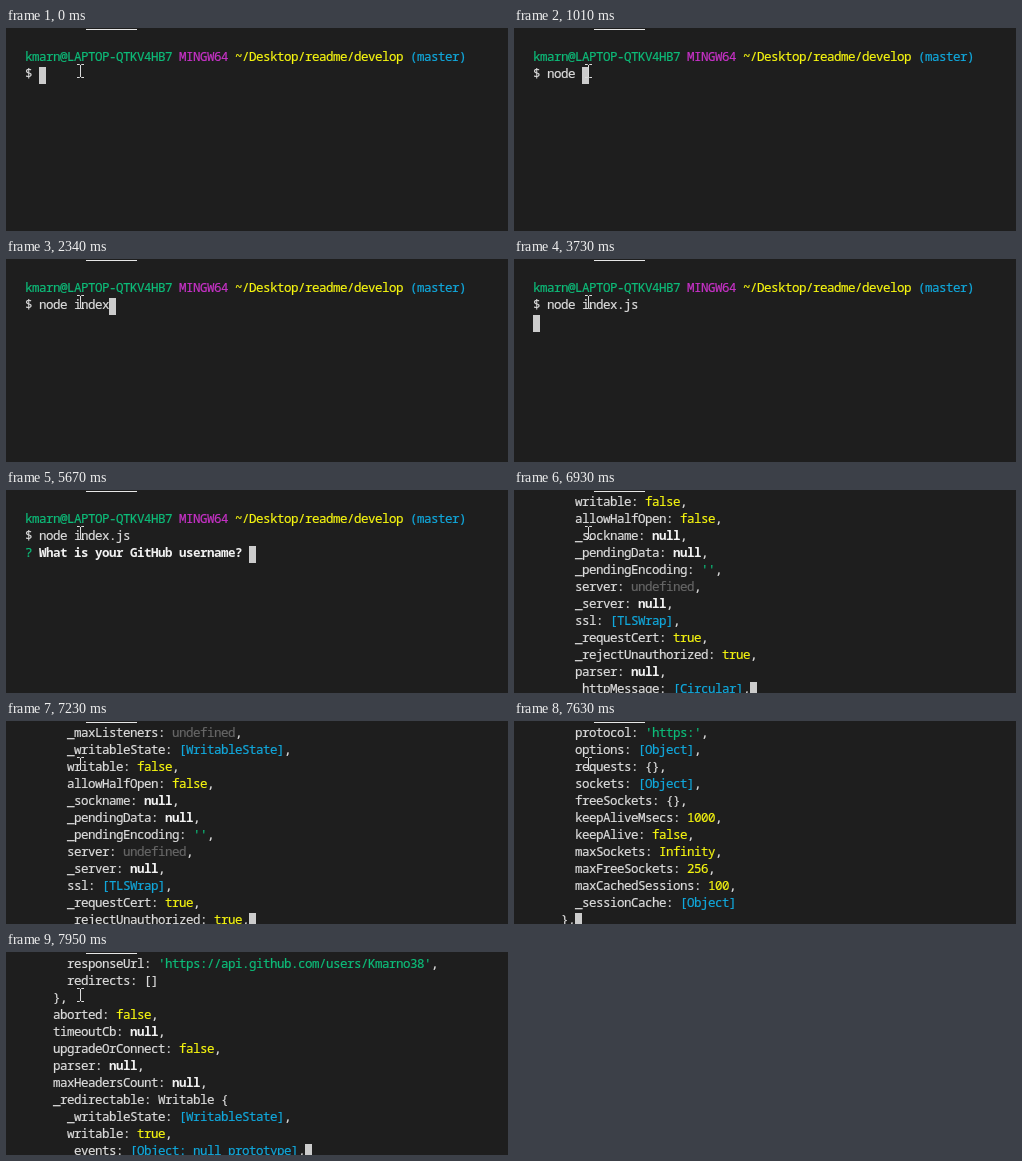
Recreate the animation shown at these times as an HTML page. Size 502 by 203 pixels, loop 8 s.

```html
<!DOCTYPE html>
<html lang="en">
<head>
<meta charset="utf-8">
<title>Terminal</title>
<style>
  html, body { margin: 0; width: 100%; height: 100%; overflow: hidden; background: #1e1e1e; }
  #stage { position: absolute; left: 0; top: 0; width: 502px; height: 203px; overflow: hidden; background: #1e1e1e; }
  #tab { position: absolute; left: 80px; top: 1px; width: 51px; height: 1px; background: #e7e7e7; }
  #screen {
    position: absolute; left: 19px; top: 3px; margin: 0; color: #dcdcdc;
    font: 12.5px/17px "Noto Sans Mono", "DejaVu Sans Mono", monospace;
    letter-spacing: -0.5px; font-variant-ligatures: none;
    -webkit-text-stroke: 0.2px;
  }
  #screen div { height: 17px; white-space: pre; }
  #cursor { position: absolute; width: 7px; height: 17px; background: #ccc; }
  #mouse { position: absolute; left: 70px; top: 35px; }
  .g { color: #0dbc79; }
  .m { color: #c832c8; }
  .y { color: #f5f510; }
  .c { color: #11a8dc; }
  .d { color: #666; }
  .b { color: #f2f2f2; font-weight: bold; -webkit-text-stroke: 0; }
</style>
</head>
<body>
<div id="stage">
  <div id="tab"></div>
  <div id="cursor"></div>
  <div id="screen"></div>
  <svg id="mouse" width="9" height="16" fill="none" stroke="#ddd">
    <path d="M1 1.5H3.5L4.5 2.5L5.5 1.5H8M4.5 2V14M1 14.5H3.5L4.5 13.5L5.5 14.5H8"/>
  </svg>
</div>
<script>
const LOOP = 8000, ROWS = 12, COL_W = 7, ROW_H = 17, LEFT = 19, TOP = 5;
const USER = 'Kmarno38';
const URL_PATH = '/users/' + USER;
const COMMAND = 'node index.js';
const KEYS = [320, 430, 550, 700, 1010, 1560, 1710, 1960, 2030, 2340, 2650, 2950, 3270];
const ENTER = 3730, ASK = 5670;
const BURSTS = [6300, 6380, 6460, 6540, 6620, 6700, 6780, 6850, 6930, 7000, 7080,
  7160, 7230, 7310, 7390, 7470, 7550, 7630, 7700, 7780, 7870, 7950];

const span = (cls, text) => `<span class="${cls}">${text}</span>`;
const PROMPT = span('g', 'kmarn@LAPTOP-QTKV4HB7') + ' ' + span('m', 'MINGW64') + ' ' +
  span('y', '~/Desktop/readme/develop') + ' ' + span('c', '(master)');
const QUESTION = span('g', '?') + span('b', ' What is your GitHub username?') + ' ';

// Colours values the way util.inspect does.
const TOKEN = /('[^']*'|\[Symbol\([^\]]*\])|(\[[A-Z][^\]]*\])|\b(undefined)\b|\b(null)\b|\b(true|false|Infinity|\d+)\b/g;
const paint = line => line.replace(TOKEN, (text, ...groups) =>
  span('gcdby'[groups.slice(0, 5).findIndex(Boolean)], text));

const block = (indent, text) => text.trim().split('\n').map(s => ' '.repeat(indent) + s);

const HEAD = block(0, `
{
  status: 200,
  statusText: 'OK',
  headers: {
    date: 'Sat, 08 Feb 2020 19:24:31 GMT',
    'content-type': 'application/json; charset=utf-8',
    'transfer-encoding': 'chunked',
    connection: 'close',
    server: 'GitHub.com',
    status: '200 OK',
    'x-ratelimit-limit': '60',
    'x-ratelimit-remaining': '57',
    'x-ratelimit-reset': '1581193240',
    'cache-control': 'public, max-age=60, s-maxage=60',
    vary: 'Accept, Accept-Encoding',
    'x-github-media-type': 'github.v3; format=json',
    'access-control-allow-origin': '*',
    'strict-transport-security': 'max-age=31536000; includeSubdomains; preload',
    'x-frame-options': 'deny',
    'x-content-type-options': 'nosniff',
    'x-xss-protection': '1; mode=block'
  },
  config: {
    url: 'https://api.github.com${URL_PATH}',
    method: 'get',
    headers: {
      Accept: 'application/json, text/plain, */*',
      'User-Agent': 'axios/0.19.2'
    },
    transformRequest: [ [Function: transformRequest] ],
    transformResponse: [ [Function: transformResponse] ],
    timeout: 0,
    adapter: [Function: httpAdapter],
    xsrfCookieName: 'XSRF-TOKEN',
    xsrfHeaderName: 'X-XSRF-TOKEN',
    maxContentLength: -1,
    validateStatus: [Function: validateStatus],
    data: undefined
  },
  request: ClientRequest {
    _events: [Object: null prototype] {
      socket: [Function],
      abort: [Function],
      aborted: [Function],
      error: [Function],
      timeout: [Function],
      prefinish: [Function: requestOnPrefinish]
    },
    _eventsCount: 6,
    _maxListeners: undefined,
    outputData: [],
    outputSize: 0,
    writable: true,
    _last: true,
    chunkedEncoding: false,
    shouldKeepAlive: false,
    useChunkedEncodingByDefault: false,
    sendDate: false,
    _removedConnection: false,
    _removedContLen: false,`);

const SOCKET = block(6, `
_tlsOptions: [Object],
_secureEstablished: true,
_securePending: false,
_newSessionPending: false,
_controlReleased: true,
_SNICallback: null,
servername: 'api.github.com',
alpnProtocol: false,
authorized: true,
authorizationError: null,
encrypted: true,
_events: [Object: null prototype],
_eventsCount: 9,
connecting: false,
_hadError: false,
_parent: null,
_host: 'api.github.com',
_readableState: [ReadableState],
readable: true,
_maxListeners: undefined,
_writableState: [WritableState],
writable: false,
allowHalfOpen: false,
_sockname: null,
_pendingData: null,
_pendingEncoding: '',
server: undefined,
_server: null,
ssl: [TLSWrap],
_requestCert: true,
_rejectUnauthorized: true,`);

const SOCKET_END = [...block(6, `
parser: null,
_httpMessage: [Circular],
[Symbol(res)]: [TLSWrap],
[Symbol(asyncId)]: 9,
[Symbol(kHandle)]: [TLSWrap],
[Symbol(timeout)]: null,
[Symbol(kBytesRead)]: 0,
[Symbol(connect-options)]: [Object]`), '    },'];

const AGENT = block(4, `
_header: 'GET ${URL_PATH} HTTP/1.1\\r\\n' +
  'Accept: application/json, text/plain, */*\\r\\n' +
  'User-Agent: axios/0.19.2\\r\\n' +
  'Host: api.github.com\\r\\n' +
  'Connection: close\\r\\n' +
  '\\r\\n',
_onPendingData: [Function: noopPendingOutput],
agent: Agent {
  _events: [Object: null prototype],
  _eventsCount: 1,
  _maxListeners: undefined,
  defaultPort: 443,
  protocol: 'https:',
  options: [Object],
  requests: {},
  sockets: [Object],
  freeSockets: {},
  keepAliveMsecs: 1000,
  keepAlive: false,
  maxSockets: Infinity,
  maxFreeSockets: 256,
  maxCachedSessions: 100,
  _sessionCache: [Object]
},`);

const TAIL = block(4, `
socketPath: undefined,
method: 'GET',
path: '${URL_PATH}',
_ended: true,
res: IncomingMessage {
  _readableState: [ReadableState],
  readable: false,
  _events: [Object: null prototype],
  _eventsCount: 3,
  _maxListeners: undefined,
  socket: [TLSSocket],
  connection: [TLSSocket],
  httpVersionMajor: 1,
  httpVersionMinor: 1,
  httpVersion: '1.1',
  complete: true,
  headers: [Object],
  rawHeaders: [Array],
  trailers: {},
  rawTrailers: [],
  aborted: false,
  upgrade: false,
  url: '',
  method: null,
  statusCode: 200,
  statusMessage: 'OK',
  client: [TLSSocket],
  _consuming: false,
  _dumped: false,
  req: [Circular],
  responseUrl: 'https://api.github.com${URL_PATH}',
  redirects: []
},
aborted: false,
timeoutCb: null,
upgradeOrConnect: false,
parser: null,
maxHeadersCount: null,
_redirectable: Writable {
  _writableState: [WritableState],
  writable: true,
  _events: [Object: null prototype],`);

const REQUEST = [...block(4, `
_removedTE: false,
_contentLength: 0,
_hasBody: true,
_trailer: '',
finished: true,
_headerSent: true,
socket: TLSSocket {`), ...SOCKET, ...SOCKET_END, '    connection: TLSSocket {', ...SOCKET];

// Each section is printed evenly up to its closing burst.
const SECTIONS = [[4, HEAD], [12, REQUEST], [17, [...SOCKET_END, ...AGENT]], [21, TAIL]];
const dump = SECTIONS.flatMap(s => s[1]);

function printed(burst) {
  let from = 1, count = 0;
  for (const [to, lines] of SECTIONS) {
    if (burst <= to) return count + Math.round(lines.length * (burst - from) / (to - from));
    count += lines.length;
    from = to;
  }
  return count;
}

const reached = (times, t) => times.filter(x => x <= t).length;

function buffer(t) {
  const lines = ['', PROMPT, '$ ' + COMMAND.slice(0, reached(KEYS, t))];
  if (t < ENTER) return lines;
  if (t < ASK) return [...lines, ''];
  const burst = reached(BURSTS, t) - 1;
  if (burst < 1) return [...lines, QUESTION + (burst < 0 ? '' : USER)];
  lines.push(QUESTION + span('c', USER));
  const count = printed(burst);
  return lines.concat(count ? dump.slice(0, count).map(paint) : '');
}

const screenEl = document.getElementById('screen');
const cursorEl = document.getElementById('cursor');
let shown = '';

function draw(now) {
  const rows = buffer(now % LOOP).slice(-ROWS);
  const html = rows.map(r => `<div>${r}</div>`).join('');
  if (html !== shown) {
    shown = html;
    screenEl.innerHTML = html;
    const col = screenEl.lastChild.textContent.length;
    cursorEl.style.left = LEFT + col * COL_W + 'px';
    cursorEl.style.top = TOP + (rows.length - 1) * ROW_H + 'px';
  }
}

const start = performance.now();
function tick() {
  draw(performance.now() - start);
  requestAnimationFrame(tick);
}
tick();
</script>
</body>
</html>
```
